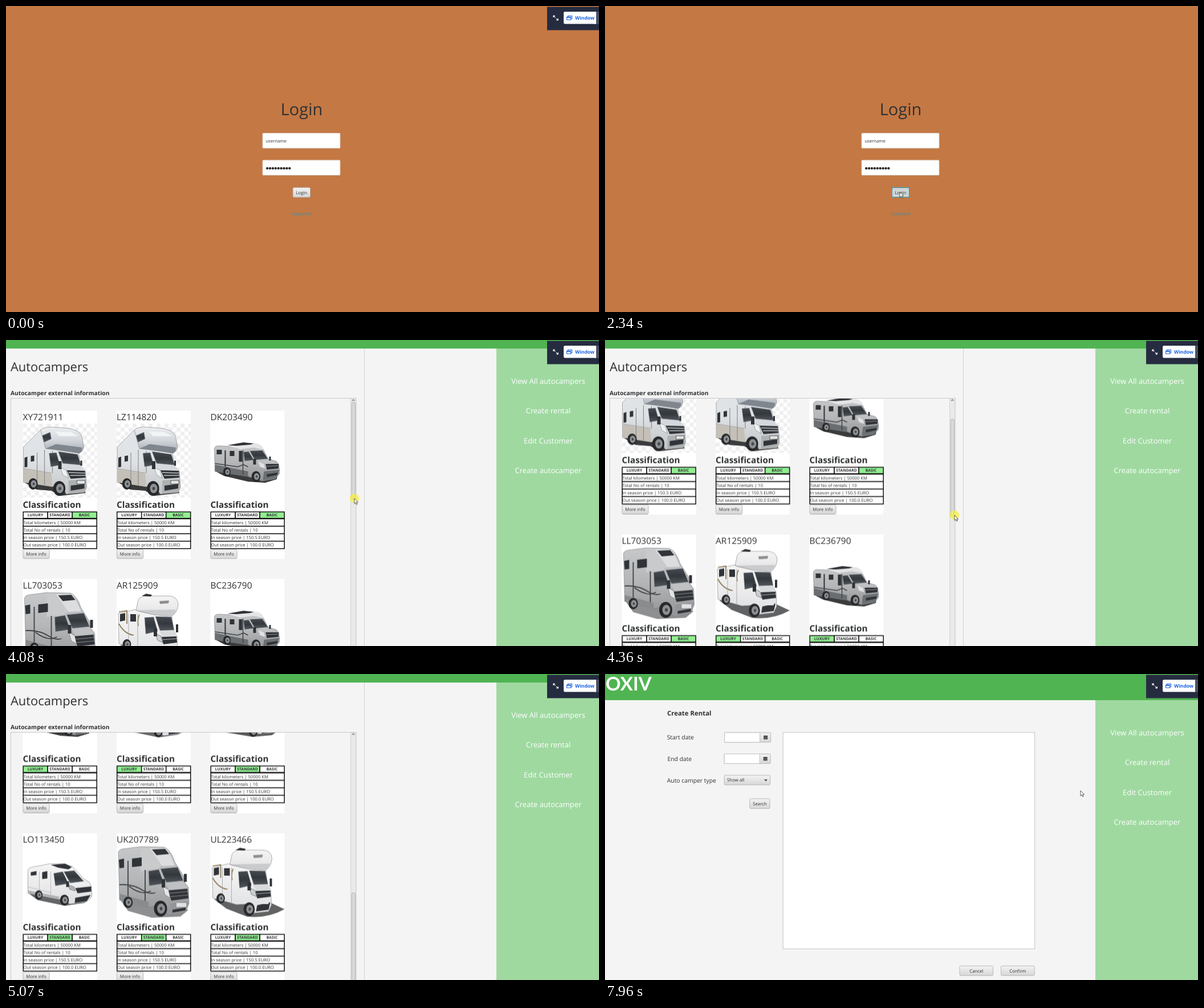
Write an HTML page that moves like this. It is 1040 px wide and 538 px high and loops after 8000 ms.

```html
<!DOCTYPE html>
<html lang="en">
<head>
<meta charset="utf-8">
<title>Autocamper rental</title>
<style>
html, body { margin: 0; width: 100%; height: 100%; overflow: hidden; background: #f4f4f4; }
svg { display: block; width: 100%; height: 100%; }
text { font-family: "Open Sans", "Noto Sans", sans-serif; text-rendering: geometricPrecision; white-space: pre; }
</style>
</head>
<body>
<script>
const LOOP = 8000;
const INK = '#2f3133';

// Drawing helpers
const rect = (x, y, w, h, fill, extra = '') =>
  `<rect x="${x}" y="${y}" width="${w}" height="${h}" fill="${fill}" ${extra}/>`;
const path = (d, fill, extra = '') => `<path d="${d}" fill="${fill}" ${extra}/>`;
const line = (d, stroke, width = 1) => path(d, 'none', `stroke="${stroke}" stroke-width="${width}"`);
const text = (x, y, size, str, { fill = INK, bold = false, mid = false, font = '' } = {}) =>
  `<text x="${x}" y="${y}" font-size="${size}" fill="${fill}"${bold ? ' font-weight="700"' : ''}${
    mid ? ' text-anchor="middle"' : ''}${font ? ` style="font-family:${font}"` : ''}>${str}</text>`;
const group = (id, body) => `<g id="${id}">${body}</g>`;
const at = (x, y, body) => `<g transform="translate(${x} ${y})">${body}</g>`;
const button = (x, y, w, h, label) =>
  rect(x, y, w, h, 'url(#btn)', 'rx="1.8" stroke="#b4b4b4" stroke-width=".9"') +
  text(x + w / 2, y + h / 2 + 2.8, 7.8, label, { mid: true });
const field = (x, y, w, h, border) =>
  rect(x, y, w, h, '#fff', `rx="1.5" stroke="${border}" stroke-width="1"`);

// Camper parts
const wheel = (x, y, r) =>
  `<ellipse cx="${x}" cy="${y}" rx="${r * .82}" ry="${r}" fill="#26282a"/>` +
  `<ellipse cx="${x + 1}" cy="${y}" rx="${r * .5}" ry="${r * .64}" fill="#8d9093"/>` +
  `<ellipse cx="${x + 1}" cy="${y}" rx="${r * .18}" ry="${r * .22}" fill="#44474a"/>`;
const shell = (d, fill) => path(d, `url(#${fill})`, 'stroke="#77797c" stroke-width=".6" stroke-linejoin="round"');
const glass = d => path(d, 'url(#glass)', 'stroke="#aaadb0" stroke-width=".5"');
const dark = d => path(d, '#303337');
const shadow = d => path(d, '#3a3b3d');

// Keyframes from [ms, value, steps to the next key]; without steps the value holds
let css = '';
const track = (id, prop, keys) => {
  const frames = keys.map(([t, value, n]) =>
    `${t / LOOP * 100}%{${prop}:${value};animation-timing-function:${n ? `steps(${n})` : 'step-end'}}`);
  css += `@keyframes ${id}{${frames.join('')}}#${id}{animation:${id} ${LOOP}ms infinite}`;
};
const move = (x, y) => `translate(${x}px,${y}px)`;
const shown = (id, ...spans) => track(id, 'opacity',
  [...(spans[0][0] ? [[0, 0]] : []), ...spans.flatMap(([from, to]) =>
    to < LOOP ? [[from, 1], [to, 0]] : [[from, 1]])]);

// Camper pictures in a 130 x 130 box
const campers = {
  alcove: rect(0, 0, 130, 130, 'url(#checks)') +
    shadow('M4 104L24 116 50 118 66 127 110 122 108 116 40 100Z') +
    shell('M1 41L31 11 46 7 66 46 98 52 101 74 110 84 112 112 108 121 76 124 68 106 52 111 1 103Z', 'silver') +
    path('M1 80L50 88 52 111 1 103Z', '#c4c0b7') +
    shell('M31 11Q36 6 50 6L78 8Q97 10 103 21L107 40Q106 49 99 52L62 46 40 44Z', 'alcove') +
    path('M40 44L58 36 104 42Q104 50 99 52L62 47Z', '#80868e') +
    glass('M34 21L48 15 50 27 37 33Z') + path('M57 14L84 15 97 22 64 22Z', '#f3f4f5') +
    dark('M3 60L8 58V76L3 77ZM14 57L20 56V66L14 67Z') +
    line('M25 51V105M38 46V108M52 48V87', '#83898f', 1.1) + line('M1 79L50 87', '#9b9a95') +
    glass('M62 49L96 54 102 73 70 70Z') + glass('M46 52L59 51 65 73 49 76Z') +
    path('M70 71L101 74 109 82 76 81Z', '#d5d9dd') + dark('M77 82L109 83 110 95 84 97Z') +
    line('M80 86L109 87M83 91L110 91', '#bfc3c7', 1.7) +
    path('M66 77L76 82 80 96 70 90Z', '#eff2f3', 'stroke="#777" stroke-width=".6"') +
    path('M80 100L111 98 111 112 108 120 80 123Z', '#aeb1b1') +
    dark('M84 109L108 106V114L84 118Z') + rect(95, 100, 14, 6, '#e4e5e5', 'stroke="#333" stroke-width=".7"') +
    dark('M62 66H68V80H62ZM101 65H104V74H101Z') + wheel(64, 114, 13) + wheel(18, 106, 10),
  low: shadow('M9 84L24 92 66 102 96 104 116 98 118 91 60 84Z') +
    shell('M7 44Q8 39 14 39L34 40 56 35 84 37 92 44 101 62 115 66Q122 70 121 88L114 97 91 101 66 93 8 84Z', 'grey') +
    path('M34 40Q45 34 60 33L82 35Q92 38 94 46L76 42 52 45Z', '#e4e5e6') + dark('M30 38L58 33 76 35 70 37 46 39Z') +
    dark('M11 46H20V54H11ZM34 48H42V57H34ZM25 47H27V82H25ZM50 48H56V67H50Z') +
    glass('M69 48L91 47 101 62 78 64Z') + glass('M58 50L67 49 76 64 60 66Z') +
    path('M8 72L66 84V93L8 84Z', '#6b6e71') + line('M8 70L48 76 58 72 66 76M57 47V90', '#404346', 1.5) +
    path('M78 65L101 63 117 68 96 70Z', '#c0c2c5') + dark('M97 71L120 71 119 79 99 81Z') +
    line('M98 75L119 74', '#8d9093', 1.2) + path('M84 67L94 71 96 79 87 76Z', '#dfe2e4') +
    path('M94 84L121 81 115 96 92 100Z', '#6d7073') + dark('M99 89L118 86V90L99 94Z') +
    dark('M75 62H80V72H75ZM103 58H106V65H103Z') + wheel(80, 93, 9.5) + wheel(29, 85, 8),
  tall: path('M6 94L20 114 62 126 112 124 126 112 60 96Z', '#8e8f90') +
    shell('M3 11Q4 6 11 5L42 1 84 2Q96 8 102 28L117 52 118 62 126 73 127 101 121 116 92 122 74 104 56 108 5 95Z', 'grey') +
    path('M42 2L58 4 80 34 72 40 42 44Z', '#c9cacc') + path('M58 4L86 4 95 18 102 34 80 35Z', '#dcdddf') +
    dark('M62 6L85 5 92 14 70 16Z') + dark('M4 24L13 22V38L5 39ZM27 22L44 20V35L27 37Z') +
    glass('M77 40L107 37 117 61 87 64Z') + glass('M56 44L74 41 83 66 57 70Z') +
    path('M86 65L117 62 125 74 92 77Z', '#bfc1c3') +
    line('M20 26V98M50 42V105M5 68Q28 66 48 79 58 85 68 82M22 71Q45 88 60 79', '#3f4346', 1.8) +
    path('M5 84L56 98V108L5 95Z', '#898b8d') +
    dark('M90 78L124 75 126 92 96 96Z') + line('M92 83L125 80M94 89L126 86', '#85888b', 1.2) +
    path('M81 71L91 77 94 91 85 86Z', '#e3e5e6', 'stroke="#666" stroke-width=".6"') +
    path('M94 101L126 97 121 115 94 120Z', '#939598') + rect(105, 100, 17, 7, '#e1e2e3') +
    dark('M98 112L121 108V113L98 117Z') + dark('M79 58H85V73H79ZM118 49H123V63H118Z') +
    wheel(77, 110, 14) + wheel(20, 99, 10),
  family: path('M6 93L28 110 64 124Q100 128 130 111L104 99Z', '#616263') +
    shell('M3 38L32 31 38 34 66 40 97 43 100 67 106 78 107 104 102 115 76 118 64 102 46 103 4 91Z', 'white') +
    shell('M34 32L38 14Q41 8 52 7H92Q107 8 108 22 107 36 96 43L66 40Z', 'white') +
    path('M38 32L104 31Q102 39 96 43L66 40Z', '#c9cbcd') + path('M75 16L92 15 91 20 76 21Z', '#8d9092') +
    dark('M44 7L52 3 62 5 60 8ZM6 39L15 37V50L6 52ZM24 39H34V52H24Z') +
    line('M4 35L18 33 18 56M4 56Q14 74 30 76M40 40Q36 48 38 60', '#8b7850', 1.7) +
    line('M37 38V100M21 38V94', '#a9abad') +
    glass('M68 43L96 44 101 67 76 68Z') + glass('M49 45L65 44 72 69 51 74Z') +
    path('M75 69L101 68 106 77 80 78Z', '#d8dadc') + dark('M79 79L105 78 106 89 82 92Z') +
    line('M80 84L106 82', '#b1b4b6', 1.2) + path('M68 73L78 78 81 89 72 85Z', '#ccd0d3', 'stroke="#555" stroke-width=".7"') +
    dark('M82 104L105 99 102 112 80 115Z') + rect(88, 96, 14, 6, '#e6e7e8') +
    dark('M65 64H71V78H65ZM104 57H108V71H104Z') + wheel(68, 111, 12) + wheel(18, 92, 9),
  white: path('M10 83L26 95 74 105 108 100 119 91 60 83Z', '#646567') +
    shell('M9 43Q10 38 17 37L48 31 73 31 87 36 106 57 116 63Q122 69 121 89L112 98 83 102 66 94 9 83Z', 'white') +
    dark('M49 33L74 31 86 37 80 41 62 38Z') + dark('M14 46L24 44V51L14 52ZM34 46L43 44V57L34 58Z') +
    glass('M72 45L90 43 107 62 83 65Z') + glass('M54 48L70 45 80 66 57 70Z') +
    line('M9 72L50 82M29 45V86M49 45V91', '#b9bbbe') + path('M9 78L64 89V94L9 83Z', '#b0b2b5') +
    path('M82 66L107 63 117 67 93 70Z', '#f0f0f1') + dark('M92 74L120 71 120 80 96 83Z') +
    path('M80 68L90 72 92 79 82 76Z', '#aeb5bb', 'stroke="#555" stroke-width=".6"') +
    dark('M92 91L119 86 112 97 91 100Z') + dark('M76 62H81V72H76Z') + wheel(73, 95, 9.5) + wheel(28, 86, 8),
  cabover: path('M9 84L26 96 74 104 108 101 120 92 60 84Z', '#575859') +
    shell('M8 40Q10 36 18 35L56 37 112 50 115 64 121 70V88L114 96 86 99 68 94 8 84Z', 'white') +
    shell('M50 37L57 30Q62 27 100 29 117 30 118 40 118 47 111 51L72 51 56 47Z', 'white') +
    dark('M82 33L104 34 108 40 85 41Z') + path('M56 46L116 45 111 51 72 52Z', '#b9bcbf') +
    dark('M14 48H24V57H14ZM33 50H43V66H33Z') + glass('M72 53L108 53 115 66 86 68Z') + glass('M58 54L70 53 82 69 60 72Z') +
    line('M29 44V88M56 48V92M8 70L60 80', '#a7aaad') + path('M8 79L68 89V94L8 84Z', '#b6b8bb') +
    dark('M94 72L119 71V82L97 84Z') + line('M95 77L119 75', '#8a8e91', 1.1) +
    path('M83 70L93 73 95 81 85 78Z', '#c1c5c8', 'stroke="#555" stroke-width=".6"') +
    dark('M92 89L119 85 114 94 90 98Z') + dark('M78 65H83V74H78Z') + wheel(75, 95, 9) + wheel(27, 87, 8)
};

const CLASSES = ['LUXURY', 'STANDARD', 'BASIC'];
const FACTS = ['Total kilometers | 50000 KM', 'Total No of rentals | 10',
  'In season price | 150.5 EURO', 'Out season price | 100.0 EURO'];
const FLEET = [
  ['XY721911', 'alcove', 2], ['LZ114820', 'alcove', 2], ['DK203490', 'low', 2],
  ['LL703053', 'tall', 2], ['AR125909', 'family', 0], ['BC236790', 'low', 0],
  ['KL104050', 'low', 0], ['KO103377', 'white', 0], ['OK203040', 'cabover', 1],
  ['LO113450', 'white', 1], ['UK207789', 'tall', 1], ['UL223466', 'family', 1]
];
const BLACK = 'stroke="#111" stroke-width="1.5"';

const card = ([plate, kind, level], i) => at(29.5 + i % 3 * 164.5, 124 + Math.floor(i / 3) * 296,
  rect(0, 0, 130, 261, '#fff') + text(0, 17.3, 15.5, plate) + at(0, 23, campers[kind]) +
  text(0, 171.3, 15.3, 'Classification', { bold: true }) +
  CLASSES.map((name, k) =>
    rect(.7 + k * 43, 178.3, 43, 11.2, k === level ? '#90ee90' : '#fff', BLACK) +
    text(22 + k * 43, 186.3, 6.8, name, { bold: true, mid: true })).join('') +
  FACTS.map((fact, k) =>
    rect(.7, 190.4 + k * 13.1, 129, 13.1, '#fff', BLACK) +
    text(1, 199.6 + k * 13.1, 7.65, fact)).join('') +
  button(.4, 244.4, 46.2, 16, 'More info'));

const LINKS = ['View All autocampers', 'Create rental', 'Edit Customer', 'Create autocamper'];
const links = (top, hover) => LINKS.map((name, i) => {
  const active = hover && i === 1;
  return text(951, top + 62 + i * 52.4 + (hover && i ? .5 : 0), 13, name,
    { mid: true, bold: active, fill: active ? '#000' : '#fff' });
}).join('');
const sidebar = (id, top) => rect(860, top, 180, 538 - top, '#9fd9a0') +
  group(id + 'Idle', links(top, false)) + group(id + 'Hover', links(top, true));
const page = top => rect(0, 0, 1040, 538, '#f4f4f4') + rect(0, 0, 1040, top, '#51b452');

const login = rect(0, 0, 1040, 538, '#c47843') +
  text(518.5, 191.5, 29, 'Login', { mid: true }) +
  field(450, 223.5, 136, 26.5, '#d8c6b6') + text(455.5, 240.2, 7.7, 'username') +
  field(450, 271, 136, 26.5, '#d8c6b6') +
  Array.from({ length: 9 }, (_, i) => `<circle cx="${458.2 + i * 4.9}" cy="285.4" r="2.15" fill="#222"/>`).join('') +
  rect(503, 320, 31, 17, '#9b7c64', 'rx="2"') + button(503.2, 319.2, 30.4, 17, 'Login') +
  group('focus', rect(503.2, 319.2, 30.4, 17, '#d0d6d4', 'rx="2" stroke="#5292a0" stroke-width="1.4"') +
    text(518.4, 330.5, 7.8, 'Login', { mid: true })) +
  text(518.7, 367.8, 7.7, 'Hyperlink', { mid: true, fill: '#3b8fae' });

const fleet = page(15) + line('M628.5 15V538', '#d2d2d2') +
  text(8, 54.5, 21.9, 'Autocampers') +
  text(8, 97, 10.25, 'Autocamper external information', { bold: true }) +
  rect(8.5, 102.5, 605.5, 500, '#f4f4f4', 'stroke="#c9c9c9"') +
  `<g clip-path="url(#pane)">${group('scroll', FLEET.map(card).join(''))}</g>` +
  rect(604.5, 103, 9.3, 500, '#e9e9e9', 'stroke="#d0d0d0" stroke-width=".8"') +
  line('M607 107L609.2 104.8 611.4 107', '#777', 1.1) +
  group('thumb', rect(606.3, 110, 6.2, 170, '#d9d9d9', 'rx="1.8" stroke="#adadad" stroke-width=".9"')) +
  sidebar('fleet', 15);

const dateField = (x, y) => rect(x, y, 81, 17, 'url(#btn)', 'rx="1.8" stroke="#b4b4b4" stroke-width=".9"') +
  rect(x, y, 62, 17, '#fff', 'stroke="#bdbdbd" stroke-width=".9"') +
  rect(x + 68.5, y + 5.3, 7, 6.6, '#444') + line(`M${x + 69} ${y + 8.2}h6m-6 2h6`, '#999', .5);

const rental = page(46) +
  text(1, 28.8, 33, 'OXIV', { fill: '#fff', bold: true, font: 'Lato,sans-serif' }) +
  text(109, 73.3, 11.4, 'Create Rental', { bold: true }) +
  text(108.7, 115.3, 10.35, 'Start date') + text(109.5, 153, 10.35, 'End date') +
  text(108.7, 190.5, 10.4, 'Auto camper type') +
  dateField(209.7, 103) + dateField(209.2, 140.5) +
  rect(209.2, 178, 80.5, 17, 'url(#btn)', 'rx="1.8" stroke="#b4b4b4" stroke-width=".9"') +
  text(214, 189.4, 7.9, 'Show all') + path('M279 185.5H285L282 188.5Z', '#333') +
  button(253.8, 219.2, 35.3, 17.3, 'Search') +
  rect(312.2, 102.8, 441.4, 380.4, '#fff', 'stroke="#c4c4c4" stroke-width="1"') +
  button(622, 513.2, 58.6, 17, 'Cancel') + button(694.6, 513.2, 58.6, 17, 'Confirm') +
  sidebar('rental', 46);

const widget = rect(949, 1.5, 91, 41, '#262c40') +
  line('M960 20V17H963M960 17L963.4 20.4M965 21.8L968.3 25M965.3 25H968.3V22', '#fff', 1.1) +
  rect(1032, 10, 12, 22, '#4a5064') + rect(978, 10, 57, 21.5, '#fff', 'rx="2.5"') +
  rect(1032, 10, 3, 21.5, '#fff') +
  line('M985.5 19V17.3H992.5V22.8H991M983.5 19.2H990.5V24.3H983.5ZM983.5 20.2H990.5', '#1b60e0', 1.1) +
  text(998, 24.1, 8.5, 'Window', { bold: true, fill: '#1b60e0' });

const pointer = group('press', '<circle r="8.3" fill="#f6ee3c" opacity=".72"/>') +
  path('M0 0V9.4L2.2 7.4 3.7 10.7 5.2 10 3.7 6.8H6.6Z', '#fff', 'stroke="#333" stroke-width=".8"');

const stop = (offset, color) => `<stop offset="${offset}" stop-color="${color}"/>`;
const gradient = (id, ...colors) => `<linearGradient id="${id}" x2="0" y2="1">${
  colors.map((c, i) => stop(i / (colors.length - 1), c)).join('')}</linearGradient>`;

document.body.innerHTML = `<svg viewBox="0 0 1040 538"><defs>
  ${gradient('btn', '#f3f3f3', '#e5e5e5', '#d6d6d6')}
  ${gradient('silver', '#e2e5e9', '#dfe2e5', '#c3c5c7')}
  ${gradient('alcove', '#eceef0', '#d3d7dc', '#a3a9b1')}
  ${gradient('grey', '#c6c8ca', '#b4b6b8', '#929496')}
  ${gradient('white', '#f4f4f4', '#ececed', '#dddee0')}
  ${gradient('glass', '#454b51', '#33383d', '#50575d')}
  <pattern id="checks" width="14" height="14" patternUnits="userSpaceOnUse">
    ${rect(0, 0, 14, 14, '#fff') + rect(0, 0, 7, 7, '#efefef') + rect(7, 7, 7, 7, '#efefef')}</pattern>
  <clipPath id="pane">${rect(9, 103, 595, 440, '#000')}</clipPath></defs>
  ${group('login', login) + group('fleet', fleet) + group('rental', rental)}
  ${group('widget', widget)}
  ${group('visible', group('pointer', pointer))}</svg>`;

// Screens and states
shown('login', [0, 2800]);
shown('fleet', [2800, 6760]);
shown('rental', [6760, LOOP]);
shown('focus', [1520, 2800]);
shown('press', [1520, 1790], [4080, 5070], [6280, 6550]);
shown('visible', [390, 5070], [5270, LOOP]);
shown('fleetIdle', [0, 5800], [6760, LOOP]);
shown('fleetHover', [5800, 6760]);
shown('rentalIdle', [0, 7240], [7440, LOOP]);
shown('rentalHover', [7240, 7440]);
track('widget', 'opacity', [[0, 1], [2210, .66], [2270, .33], [2340, 0], [3060, .33], [3130, .66], [3190, 1]]);

// Dragging the thumb scrolls the list
const drag = [[4080, 0, 4], [4360, 78.5, 3], [4560, 429, 5], [4870, 732.5]];
const dragged = ratio => [[0, move(0, 0)], ...drag.map(([t, y, n]) => [t, move(0, -y * ratio), n])];
track('scroll', 'transform', dragged(1));
track('thumb', 'transform', dragged(-1 / 2.664));

track('pointer', 'transform', [
  [0, 667, 372], [390, 667, 372, 2], [540, 499.5, 311.5], [850, 502, 314, 5], [1190, 517, 327],
  [3060, 521, 325, 11], [3800, 611, 278.5], [4080, 611, 278.5, 4], [4360, 613, 308, 3],
  [4560, 647, 439, 5], [4870, 655.5, 531.5, 3], [5070, 656, 545], [5270, 757, 427, 8],
  [5860, 925, 109, 2], [6010, 920, 117], [6080, 920, 128.5], [7170, 918, 135, 2],
  [7310, 905, 165, 3], [7530, 840, 200, 2], [7680, 766, 215, 4], [7960, 834, 205]
].map(([t, x, y, n]) => [t, move(x, y), n]));

document.head.appendChild(document.createElement('style')).textContent = css;
</script>
</body>
</html>
```
